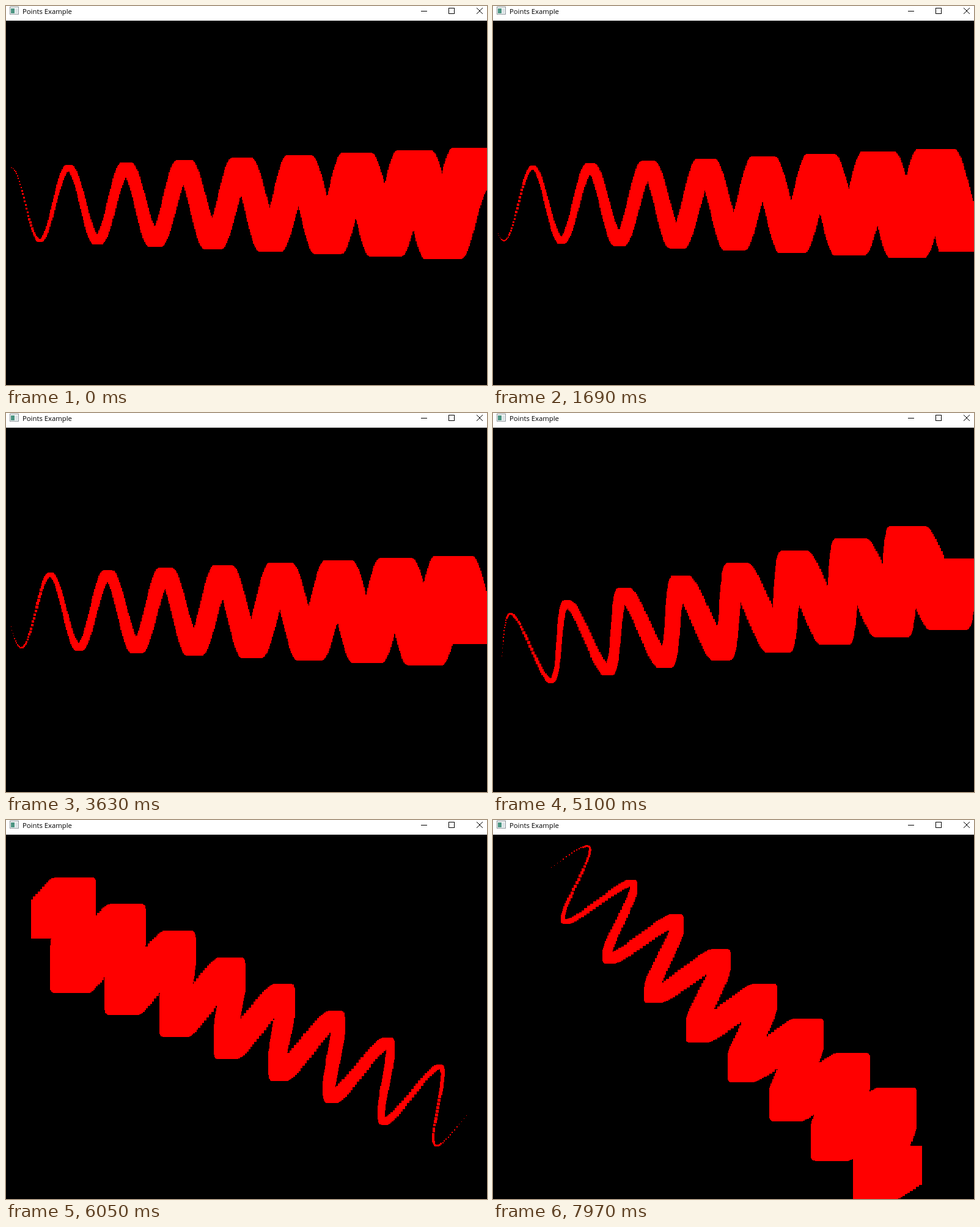
Write an HTML page with a canvas that moves like this. It is 787x620 px and loops after 8000 ms.

```html
<!DOCTYPE html>
<html lang="en">
<head>
<meta charset="utf-8">
<title>Points Example</title>
<style>
  html, body { margin: 0; width: 100%; height: 100%; overflow: hidden; background: #000; }
  canvas, svg { position: absolute; left: 0; top: 0; display: block; }
  text { font: 11.3px "Open Sans", "Noto Sans", sans-serif; }
</style>
</head>
<body>
<canvas id="view" width="787" height="620"></canvas>
<svg width="787" height="24" viewBox="0 0 787 24">
  <rect width="787" height="24" fill="#fff"/>
  <g shape-rendering="crispEdges">
    <rect x="6.5" y="1.5" width="14" height="12" fill="#f4f6f7" stroke="#8c969b"/>
    <rect x="8" y="4" width="6" height="8" fill="#4b9482"/>
    <rect x="15" y="4" width="4" height="8" fill="#dbe3e6"/>
  </g>
  <text x="27" y="13">Points Example</text>
  <g fill="none" stroke="#000">
    <path d="M679 8.5h10M724.5 3.5h9v9h-9z" shape-rendering="crispEdges"/>
    <path d="M770 3l10 10M780 3l-10 10"/>
  </g>
</svg>
<script>
const LOOP = 8000;
const TOP = 24;
const CENTER = { x: 397.7, y: 324 };
const START_X = -389.7;   // first point, relative to the centre
const AMPLITUDE = 60;
const RADIUS = 15;        // pixels per radian along the axis
const TURNS = 8;

// Key presses: [time, total presses so far]; a long gap is the repeat delay.
const SHIFT_KEYS = [[0, 0], [400, 1], [900, 2], [1690, 25], [3630, 83], [4580, 109]];
const TURN_KEYS = [[0, 0], [4600, 1], [5100, 2], [5630, 17], [5650, 18], [6330, 41],
                   [6820, 42], [7070, 50], [7570, 51], [7970, 64]];

const ctx = document.getElementById("view").getContext("2d");

function presses(keys, t) {
  const next = keys.findIndex(k => k[0] > t);
  if (next < 0) return keys[keys.length - 1][1];
  const [t0, n0] = keys[next - 1];
  const [t1, n1] = keys[next];
  return Math.floor(n0 + (n1 - n0) * (t - t0) / (t1 - t0) + 1e-6);
}

function draw(t) {
  const phase = Math.PI / 2 + 0.1 * presses(SHIFT_KEYS, t);
  const turn = 5 * presses(TURN_KEYS, t) * Math.PI / 180;
  const cos = Math.cos(turn), sin = Math.sin(turn);

  ctx.fillStyle = "#000";
  ctx.fillRect(0, 0, 787, 620);
  ctx.fillStyle = "#f00";

  for (let i = 0; i * 0.1 <= TURNS * 2 * Math.PI; i++) {
    const angle = i * 0.1;
    const x = START_X + RADIUS * angle;
    const y = AMPLITUDE * Math.sin(angle + phase);
    const size = Math.round(1 + i * 0.125);
    const left = Math.round(CENTER.x + x * cos - y * sin - size / 2);
    const top = Math.round(CENTER.y - x * sin - y * cos - size / 2);
    if (top + size > TOP) ctx.fillRect(left, top, size, size);
  }
}

function tick() {
  draw(performance.now() % LOOP);
  requestAnimationFrame(tick);
}
tick();
</script>
</body>
</html>
```
